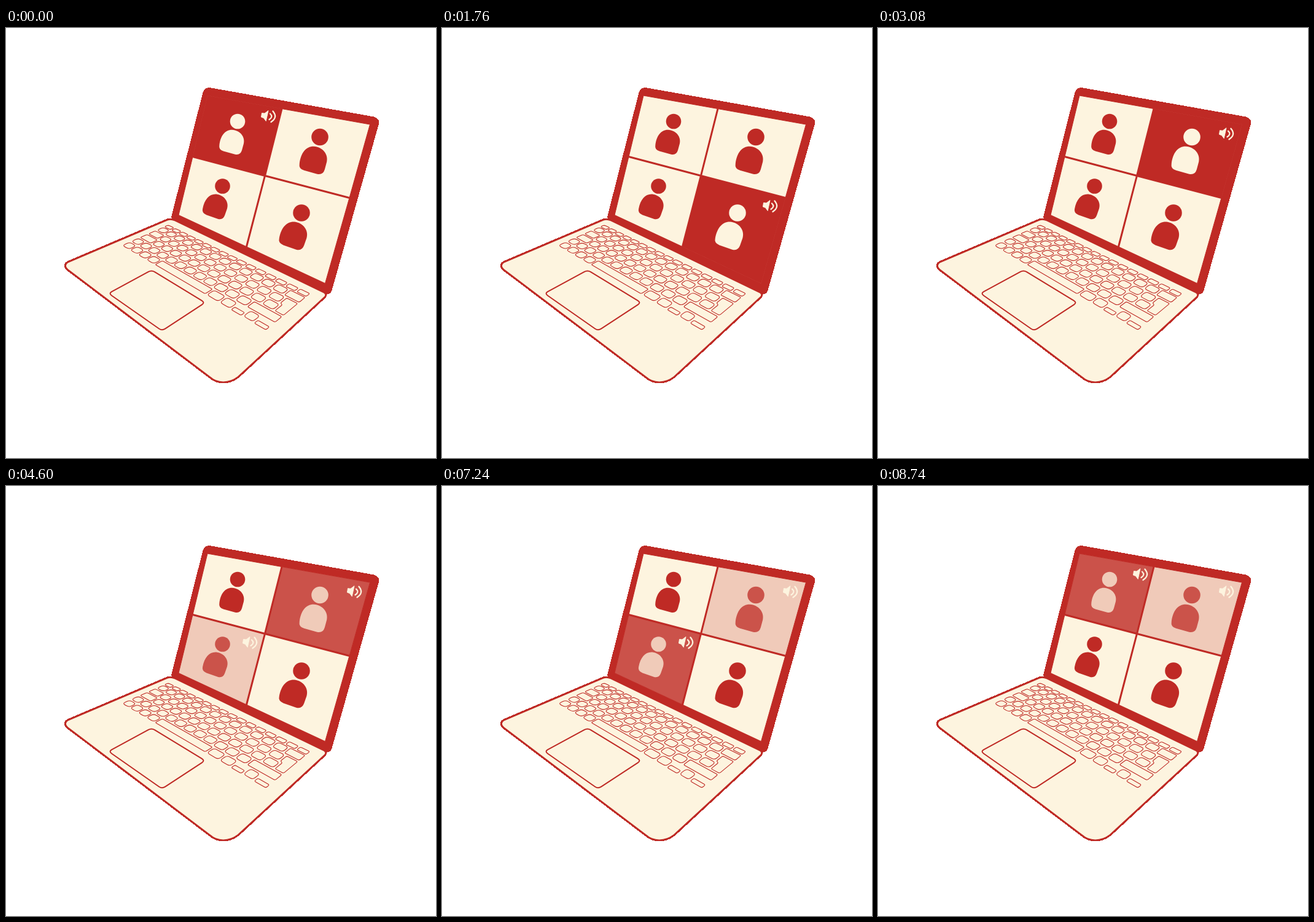
An HTML page that plays this animation: 700 px wide and 700 px high, repeating every 8.8 s.

```html
<!DOCTYPE html>
<html lang="en">
<head>
<meta charset="utf-8">
<title>Video call</title>
<style>
  :root { --red: #bf2a25; --cream: #fdf4df; }
  html, body { margin: 0; width: 100%; height: 100%; overflow: hidden; background: #fff; }
  svg { display: block; width: 100vw; height: 100vh; }
  .red { fill: var(--red); }
  .cream { fill: var(--cream); }
  .crisp { shape-rendering: crispEdges; }
  .line { fill: var(--cream); stroke: var(--red); stroke-linejoin: round; }
  .wave { fill: none; stroke: var(--cream); stroke-width: 2.3; stroke-linecap: round; }
  .live { opacity: 0; animation: 8800ms steps(5, start) infinite; }
  #tl { animation-name: tl; }
  #tr { animation-name: tr; }
  #bl { animation-name: bl; }
  #br { animation-name: br; }
  @keyframes tl {
    0%, 17.27% { opacity: 1; }
    20.68% { opacity: 0; }
    97.27% { opacity: 0; animation-timing-function: steps(4, start); }
    100% { opacity: .8; }
  }
  @keyframes br {
    0%, 17.27% { opacity: 0; }
    20.68%, 32.27% { opacity: 1; }
    35.68%, 100% { opacity: 0; }
  }
  @keyframes tr {
    0%, 32.27% { opacity: 0; }
    35.68%, 52.27% { opacity: 1; }
    55.68%, 82.27% { opacity: 0; }
    85.68% { opacity: 1; }
    97.27% { opacity: 1; animation-timing-function: steps(4, start); }
    100% { opacity: .2; }
  }
  @keyframes bl {
    0%, 52.27% { opacity: 0; }
    55.68%, 82.27% { opacity: 1; }
    85.68%, 100% { opacity: 0; }
  }
</style>
</head>
<body>
<svg viewBox="0 0 700 700">
  <defs>
    <path id="body" d="M-29.700 39C-28 23-20 13.500-9 13.700C4 14.500 12.500 25 10 36L7 47Q4.500 55.500-4 53.700L-23 48.500Q-31 46-29.700 39Z"/>
    <g id="sound">
      <path class="cream" stroke="#fdf4df" stroke-linejoin="round" d="M-10.500-5L-6-4.500L0-9L-3.800 8L-7.500 3L-11.500 1.500Z"/>
      <path class="wave" d="M3-4Q8.500 1 1.500 5.500"/>
      <path class="wave" d="M7.500-8Q16 2 4.500 9.500"/>
    </g>
    <path id="base" d="M262 312.500L101 381Q92.500 386 100.500 393.500L332 568.500C344 579.500 363 579.500 378 568L519 438Q523 433.500 517 430L275 313Q268 310 262 312.500Z"/>
  </defs>
  <path class="red crisp" d="M269 308L320.500 105Q323 96 333 97.300L598 144.300Q609 147 606.700 157L530.500 427Q528 434.500 520 433.500L275 320Z"/>
  <g id="screen"></g>
  <path id="grid" fill="none" stroke="#bf2a25" stroke-width="3"/>
  <use href="#base" class="line crisp" stroke-width="3.6"/>
  <use href="#base" class="line" stroke-width="2.6"/>
  <path class="line" id="pad" stroke-width="2"/>
  <path class="line" id="keys" stroke-width="1.1"/>
</svg>
<script>
  const $ = id => document.getElementById(id);

  // Closed polygon with rounded corners
  function rounded(pts, r) {
    const n = pts.length;
    const toward = (p, q) => {
      const len = Math.hypot(q[0] - p[0], q[1] - p[1]);
      const k = Math.min(r / len, 0.42);
      return [p[0] + (q[0] - p[0]) * k, p[1] + (q[1] - p[1]) * k];
    };
    return pts.map((p, i) => {
      const a = toward(p, pts[(i + n - 1) % n]);
      const b = toward(p, pts[(i + 1) % n]);
      return `${i ? 'L' : 'M'}${a}Q${p} ${b}`;
    }).join('') + 'Z';
  }

  // Perspective map from the unit square to a quad
  function perspective([x0, y0], [x1, y1], [x2, y2], [x3, y3]) {
    const sx = x0 - x1 + x2 - x3, sy = y0 - y1 + y2 - y3;
    const ax = x1 - x2, ay = y1 - y2, bx = x3 - x2, by = y3 - y2;
    const den = ax * by - bx * ay;
    const g = (sx * by - bx * sy) / den, h = (ax * sy - sx * ay) / den;
    return (u, v) => {
      const w = 1 + g * u + h * v;
      return [
        (x0 + (x1 - x0 + g * x1) * u + (x3 - x0 + h * x3) * v) / w,
        (y0 + (y1 - y0 + g * y1) * u + (y3 - y0 + h * y3) * v) / w
      ];
    };
  }

  // Screen: corner points of the 2 x 2 tiles, row by row
  const mesh = [
    [[328, 110], [449, 131.5], [592.5, 157]],
    [[304, 209.5], [421.5, 240.5], [559, 276.5]],
    [[281, 304.5], [391.5, 356], [519.5, 415.7]]
  ];
  const tiles = [
    { id: 'tl', head: [377, 152], icon: [427, 143.5] },
    { id: 'tr', head: [511, 177.5], icon: [567, 171.7] },
    { id: 'bl', head: [352.5, 257.5], icon: [397, 254.5] },
    { id: 'br', head: [481, 301], icon: [534, 289.5] }
  ];

  function drawTile({ id, head, icon }, i) {
    const r = i >> 1, c = i % 2;
    const quad = [mesh[r][c], mesh[r][c + 1], mesh[r + 1][c + 1], mesh[r + 1][c]].join(' ');
    const size = c ? 1.12 : 1, tilt = r * 4;
    const paint = (back, front) => `<polygon class="${back}" points="${quad}"/>
      <g class="${front}" transform="translate(${head}) scale(${size})">
      <circle r="12.3"/><use href="#body" transform="rotate(${tilt})"/></g>`;
    return paint('cream', 'red') + `<g class="live" id="${id}">${paint('red', 'cream')}
      <use href="#sound" transform="translate(${icon})"/></g>`;
  }

  $('screen').innerHTML = tiles.map(drawTile).join('');

  const [top3, mid3, low3] = mesh;
  $('grid').setAttribute('d', `M${mid3.join('L')}M${top3[1]}L${mid3[1]}L${low3[1]}` +
    `M${top3.join('L')}L${mid3[2]}L${low3[2]}L${low3[1]}L${low3[0]}L${mid3[0]}Z`
      .replace(/^/, '').slice(0, 0));
  $('screen').insertAdjacentHTML('beforeend',
    `<path fill="none" stroke="#bf2a25" stroke-width="1" d="M${top3.join('L')}L${mid3[2]}L${low3[2]}L${low3[1]}L${low3[0]}L${mid3[0]}Z"/>`);

  $('pad').setAttribute('d', rounded([[237, 394], [324, 447], [254, 493], [167, 432]], 6));

  // Keyboard: a thin function row above five rows measured in key units
  const units = 14.3, thin = 0.11;
  const plane = perspective([264, 320], [497, 432.5], [424, 493], [187, 354]);
  const at = (x, y) => plane(x / units, y < 0 ? thin * (1 + y) : thin + y * (1 - thin) / 5);
  const ones = n => Array(n).fill(1);

  function key(x, y, w, h, r) {
    const dx = 0.08, dy = 0.1 * h;
    return rounded([
      at(x + dx, y + dy), at(x + w - dx, y + dy),
      at(x + w - dx, y + h - dy), at(x + dx, y + h - dy)
    ], r);
  }

  function row(y, widths, half = []) {
    let x = 0;
    return widths.map((w, i) => {
      const drop = half.includes(i) ? 0.5 : 0;
      const r = y < 0 || drop || w > 1.2 ? 2.5 : 5;
      const d = key(x, y + drop, w, 1 - drop, r);
      x += w;
      return d;
    }).join('');
  }

  const enter = [[13.38, 1.1], [14.22, 1.1], [14.22, 2.9], [13.58, 2.9], [13.58, 2], [13.38, 1.9]];

  $('keys').setAttribute('d', [
    row(-1, ones(16).map(() => units / 16)),
    row(0, [...ones(13), 1.3]),
    row(1, [1.3, ...ones(12)]),
    row(2, [1.5, ...ones(12)]),
    row(3, [...ones(12), 2.3]),
    row(4, [...ones(4), 5.28, 1.16, 1, 0.96, 0.88, 1.02], [7, 9]),
    rounded(enter.map(p => at(...p)), 2.5)
  ].join(''));
</script>
</body>
</html>
```
